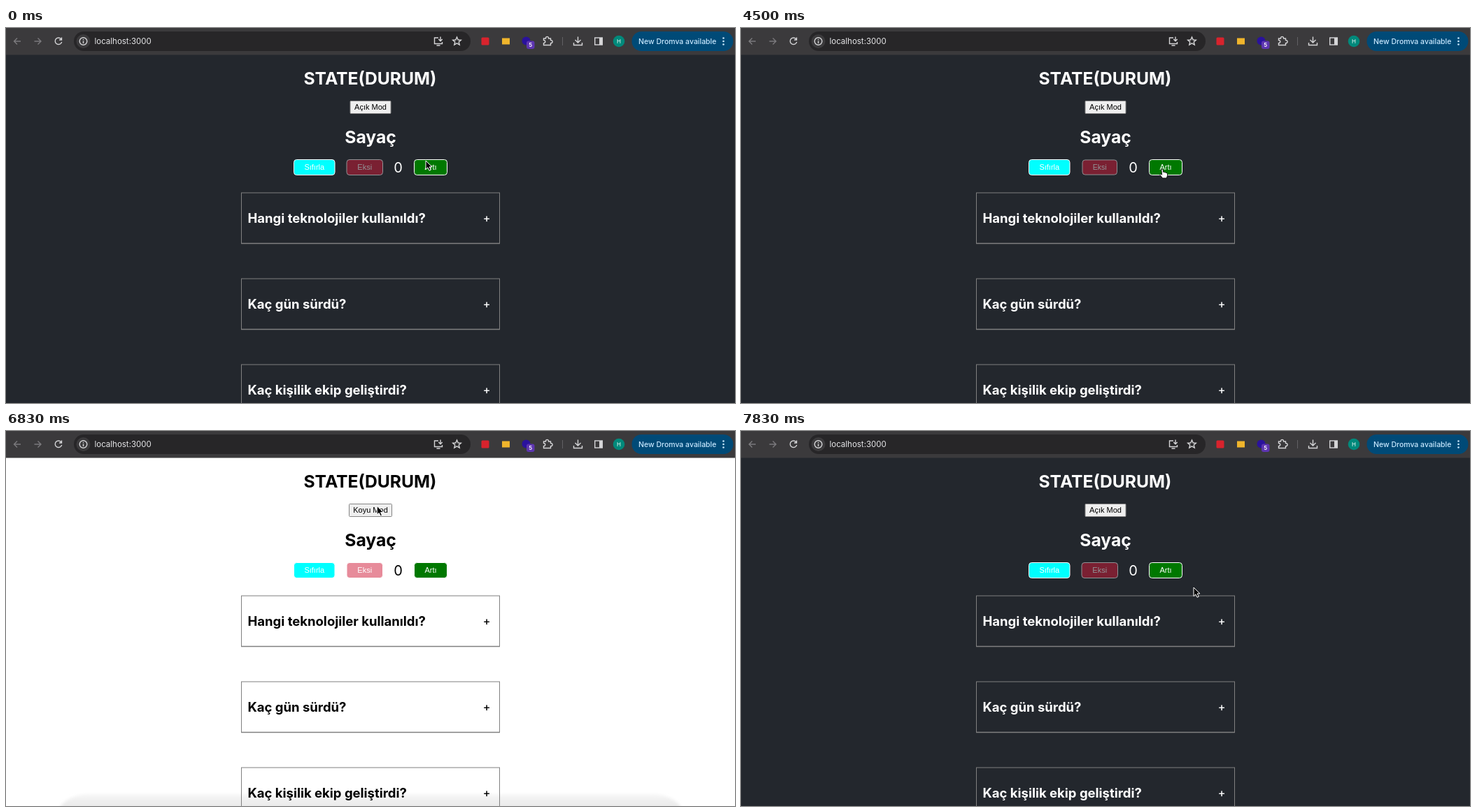
An HTML page that plays this animation: 1042x537 px, repeating every 8000 ms.

```html
<!DOCTYPE html>
<html lang="tr">
<head>
<meta charset="utf-8">
<title>State</title>
<style>
html, body { margin: 0; width: 100%; height: 100%; overflow: hidden; }
body { background: #23272d; }
svg { display: block; width: 1042px; height: 537px; font-family: Inter, sans-serif; }
#page { --bg: #23272d; --ink: #fff; }
#page.light { --bg: #fff; --ink: #000; }
#bg { fill: var(--bg); }
.ink { fill: var(--ink); }
.mid { text-anchor: middle; }
.h1 { font-size: 24.7px; font-weight: 700; }
.h2 { font-size: 18.5px; font-weight: 700; }
.plus { font-size: 16px; font-weight: 500; }
.btn { font: 11px "Liberation Sans", Arial, sans-serif; text-anchor: middle; fill: #fff; }
.btn rect { stroke: #fff; }
.line { fill: none; stroke: #d5d5d7; stroke-width: 1.4; }
#dock { display: none; }
.light #dock { display: block; }
</style>
</head>
<body>
<svg viewBox="0 0 1042 537">
  <defs>
    <linearGradient id="shade" x1="0" y1="0" x2="0" y2="1">
      <stop offset="0" stop-color="#f7f7f7"/><stop offset=".3" stop-color="#e9e9e9"/>
    </linearGradient>
    <filter id="soft"><feGaussianBlur stdDeviation="2"/></filter>
  </defs>

  <g id="page">
    <rect id="bg" width="1042" height="537"/>
    <rect id="dock" x="74" y="520" width="894" height="60" rx="45" fill="url(#shade)" filter="url(#soft)"/>
    <text class="ink mid h1" x="520.5" y="81">STATE(DURUM)</text>
    <g class="btn">
      <rect id="modeBox" y="104.5" height="18" rx="1" fill="#efefef" style="stroke:#858585"/>
      <text id="modeText" x="521" y="117" fill="#000"></text>
    </g>
    <text class="ink mid h1" x="521" y="165">Sayaç</text>
    <g id="buttons"></g>
    <text id="count" class="ink mid" x="560.5" y="207" font-size="20"></text>
    <g id="cards"></g>
  </g>

  <g id="toolbar">
    <rect width="1042" height="38.5" fill="#3b3a3c"/>
    <g class="line" style="stroke:#7b7a7d">
      <path d="M21 19H11.5M16 14.5L11.5 19L16 23.5"/>
      <path d="M40.500 19H50M45.500 14.500L50 19L45.500 23.500"/>
    </g>
    <path class="line" d="M79 16A4.800 4.800 0 1 0 79.700 20M79.500 13.500V17H76"/>
    <rect x="97" y="5" width="567" height="28" rx="14" fill="#272628"/>
    <circle cx="110.500" cy="19" r="10" fill="#3b3a3c"/>
    <circle class="line" cx="110.500" cy="19" r="5.300"/>
    <path class="line" d="M110.500 18.500V22M110.500 16V17.300"/>
    <text x="126.500" y="23" font-size="11.500" fill="#e6e6e8">localhost:3000</text>
    <g class="line">
      <path d="M618 14H612.500V22.500H623.500V20M615.500 25H620.500M621 12.500V18.500M618.300 16L621 18.700L623.700 16"/>
      <path d="M644.500 13L646.200 17L650.300 17.300L647.200 20L648.200 24L644.500 21.800L640.800 24L641.800 20L638.700 17.300L642.800 17Z"/>
      <path d="M768.500 15H771.500C771 11.500 776 11.500 775.500 15H778.500V17.500C782 17.200 782 22 778.500 21.700V24.500H768.500V21.700C771.500 21.500 771.500 17.500 768.500 17.500Z"/>
      <path d="M817.500 12.500V20.500M813.500 17L817.500 21L821.500 17M811.500 21V24.500H823.500V21"/>
      <rect x="841.700" y="14" width="10.600" height="10"/>
    </g>
    <rect x="848" y="14" width="4.500" height="10" fill="#d5d5d7"/>
    <rect x="679.500" y="13.500" width="11" height="11" rx="1.500" fill="#d8232d"/>
    <rect x="709" y="14.500" width="11" height="9" fill="#f0b52c"/>
    <circle cx="743.500" cy="18.500" r="6" fill="#2a129c"/>
    <rect x="744" y="18.500" width="11.500" height="11.500" rx="3" fill="#5d35b0"/>
    <text class="mid" x="749.700" y="27" font-size="8" font-weight="600" fill="#fff">5</text>
    <path d="M795.500 13V25" stroke="#626164"/>
    <circle cx="876" cy="19" r="8.300" fill="#00897b"/>
    <text class="mid" x="876" y="22" font-size="8" fill="#fff">H</text>
    <rect x="894.500" y="5" width="145" height="28" rx="14" fill="#004a77"/>
    <text x="904" y="22.800" font-size="10.500" font-weight="500" fill="#c9e8ff">New Dromva available</text>
    <g fill="#c9e8ff">
      <circle cx="1025.500" cy="14.500" r="1.300"/><circle cx="1025.500" cy="19" r="1.300"/><circle cx="1025.500" cy="23.500" r="1.300"/>
    </g>
  </g>

  <g id="pointer">
    <g id="ring" fill="none"></g>
    <path id="arrow" d="M0 0V12.500L2.900 9.800L5 14.200L7.200 13.200L5.200 8.900H9Z" fill="#000" stroke="#fff"/>
    <path id="hand" d="M-1.200 .8C-1.200-.5 1-.5 1.200 .8L1.700 4.500C2.200 3.800 3.500 4 3.700 5C4.400 4.300 5.500 4.700 5.700 5.600C6.700 5.200 7.500 5.800 7.500 7V9.500L6.300 13H.5L-2.800 8.700C-3.600 7.400-2.300 6.500-1.200 7.500L-.4 8.200Z" fill="#fff" stroke="#000" stroke-width=".9"/>
  </g>
</svg>
<script>
const LOOP = 8000, STEP = 1000 / 6;
const $ = id => document.getElementById(id);

const buttons = {
  reset: { label: "Sıfırla", x: 411.5, w: 58.5, fill: "#00ffff", apply: () => 0 },
  minus: { label: "Eksi", x: 487, w: 51.5, fill: "#d01a38", apply: n => n - 1 },
  plus: { label: "Artı", x: 583.5, w: 47, fill: "#007800", apply: n => n + 1 }
};

// step, x, y
const path = [
  [0, 600, 190], [2, 605, 200], [14, 605, 200], [16, 517, 201], [25, 517, 201],
  [27, 602, 202], [33, 602, 202], [34, 440, 202], [36, 440, 202],
  [38, 531, 107], [40, 530.5, 107], [42, 530, 108], [44, 526.5, 116], [45, 527, 116], [47, 647, 224]
];

// step, button, ring radius
const presses = [
  [3, "plus", 18], [5, "plus", 26], [7, "plus", 18], [9, "plus", 26], [11, "plus", 18],
  [18, "minus", 0], [20, "minus", 18], [22, "minus", 26], [24, "minus", 18], [25, "minus", 26],
  [28, "plus", 18], [30, "plus", 26], [32, "plus", 18],
  [35, "reset", 18], [40, "mode", 18.5], [44, "mode", 18]
];

$("buttons").innerHTML = Object.entries(buttons).map(([id, b]) => `
  <g class="btn" id="${id}">
    <rect x="${b.x}" y="188.5" width="${b.w}" height="22" rx="4" fill="${b.fill}"/>
    <text x="${b.x + b.w / 2}" y="203">${b.label}</text>
  </g>`).join("");

$("cards").innerHTML = ["Hangi teknolojiler kullanıldı?", "Kaç gün sürdü?", "Kaç kişilik ekip geliştirdi?"]
  .map((title, i) => `
  <g transform="translate(0 ${i * 123})">
    <rect x="336.5" y="236" width="369" height="72.500" fill="none" stroke="#808080"/>
    <path d="M336 308.500H706" stroke="#808080" stroke-width="1.500"/>
    <text class="ink h2" x="345.500" y="279">${title}</text>
    <text class="ink mid plus" x="687" y="277.500">+</text>
  </g>`).join("");

function pointerAt(step) {
  const i = Math.max(1, path.findIndex(p => p[0] >= step));
  const [s0, x0, y0] = path[i - 1], [s1, x1, y1] = path[i];
  const f = (step - s0) / (s1 - s0);
  return [x0 + (x1 - x0) * f, y0 + (y1 - y0) * f];
}

function drawRing(r) {
  const circle = (radius, color, width) =>
    `<circle r="${radius}" stroke="${color}" stroke-width="${width}"/>`;
  $("ring").innerHTML = r
    ? circle(r - .5, "#c4c4c4", .8) + circle(r - 2.3, "#d8d8d8", .8) + circle(r - 1.4, "#000", 1.3)
    : "";
}

function draw(step) {
  let count = 0, light = false;
  for (const [at, id] of presses) {
    if (at >= step) break;
    if (id === "mode") light = !light;
    else count = buttons[id].apply(count);
  }
  const press = presses.find(p => p[0] === step);
  const [x, y] = pointerAt(step);
  let overButton = false;

  for (const [id, b] of Object.entries(buttons)) {
    // the disabled button springs back late
    const down = press?.[1] === id || (id === "minus" && (step === 26 || step === 27));
    const cx = b.x + b.w / 2;
    $(id).setAttribute("transform", down ? `translate(${cx} 199.5) scale(.96) translate(${-cx} -199.5)` : "");
    overButton ||= x > b.x && x < b.x + b.w && y > 191 && y < 210;
  }
  $("minus").setAttribute("opacity", count ? 1 : .5);
  $("count").textContent = count;

  $("page").classList.toggle("light", light);
  $("modeText").textContent = light ? "Koyu Mod" : "Açık Mod";
  $("modeText").style.fill = "#000";
  $("modeBox").setAttribute("x", light ? 490.5 : 492);
  $("modeBox").setAttribute("width", light ? 61 : 58);

  $("pointer").setAttribute("transform", `translate(${x} ${y})`);
  $("hand").style.display = overButton ? "" : "none";
  $("arrow").style.display = overButton ? "none" : "";
  drawRing(press ? press[2] : 0);
}

const start = performance.now();
let shown = -1;
function tick() {
  const t = (performance.now() - start) % LOOP;
  const step = Math.floor((t + 4) / STEP) % 48;
  if (step !== shown) draw(shown = step);
  requestAnimationFrame(tick);
}
tick();
</script>
</body>
</html>
```
